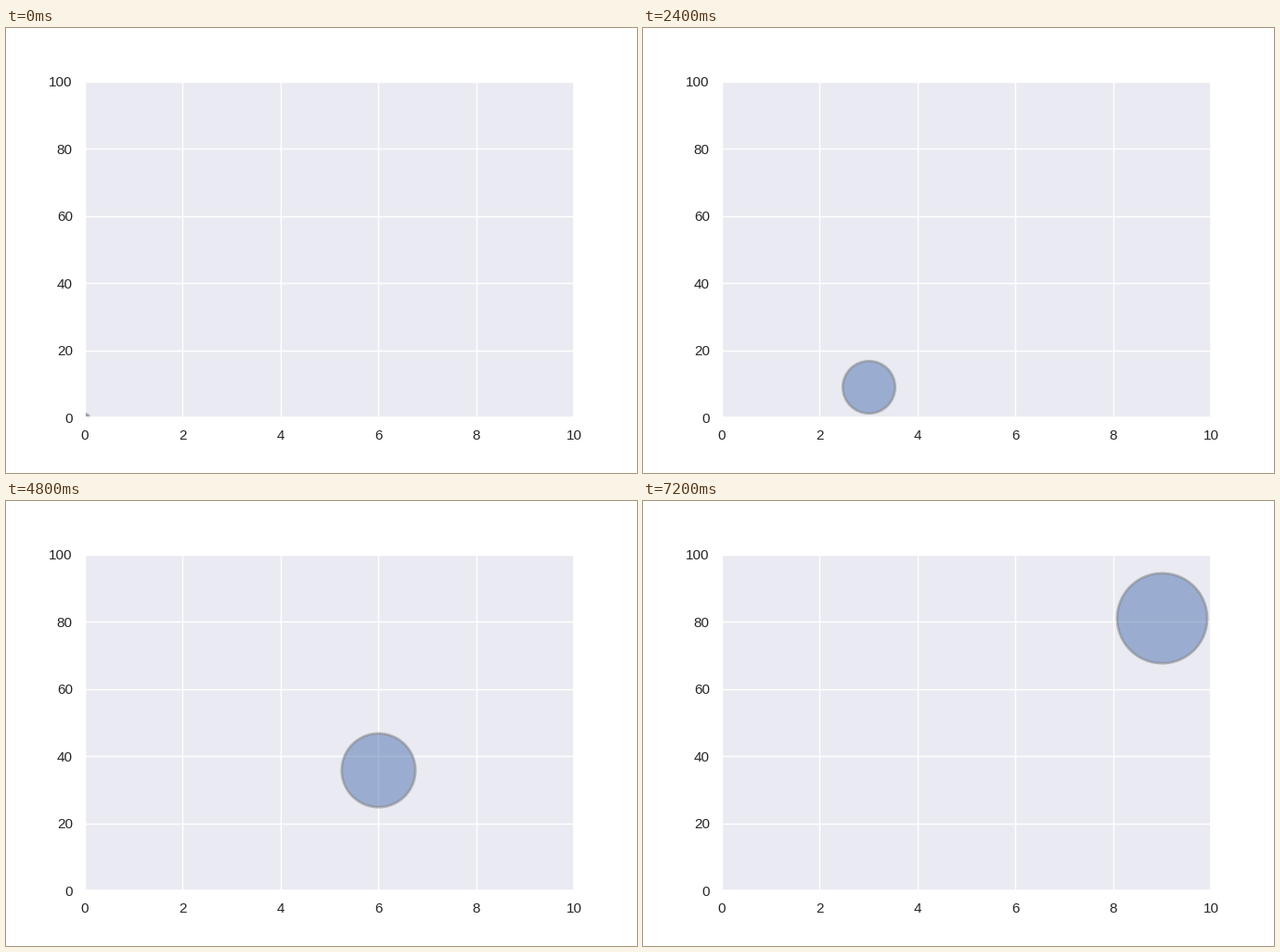
A matplotlib script for the animation above (8000 ms loop, 680 by 480 pixels).

```python
import matplotlib.pyplot as plt
from matplotlib.animation import FuncAnimation

FRAMES = 10
STEP_MS = 800

plt.rcParams.update({
    "font.family": "Liberation Sans",
    "text.color": ".15",
    "axes.facecolor": "#EAEAF2",
    "axes.edgecolor": "white",
    "axes.linewidth": 1.25,
    "axes.axisbelow": True,
    "axes.grid": True,
    "grid.color": "white",
    "grid.linestyle": "-",
    "grid.linewidth": 1,
})

fig, ax = plt.subplots(figsize=(6.8, 4.8), dpi=100, facecolor="white")
fig.subplots_adjust(left=0.125, right=0.9, bottom=0.125, top=0.88)
ax.set(xlim=(0, 10), ylim=(0, 100))
# Hidden ticks still hold the labels away from the axes.
ax.tick_params(length=6, pad=3.5, bottom=False, left=False,
               labelsize=11, labelcolor=".15")

bubble = ax.scatter([0], [0], s=36, c="#4C72B0", alpha=0.5,
                    edgecolors="gray", linewidths=2)


def update(x):
    """Move the bubble along y = x**2 while its area grows linearly."""
    bubble.set_offsets([(x, x ** 2)])
    bubble.set_sizes([36 + 540 * x])
    return (bubble,)


anim = FuncAnimation(fig, update, frames=FRAMES, interval=STEP_MS,
                     init_func=lambda: update(0), repeat=True,
                     repeat_delay=0)
plt.show()
```
